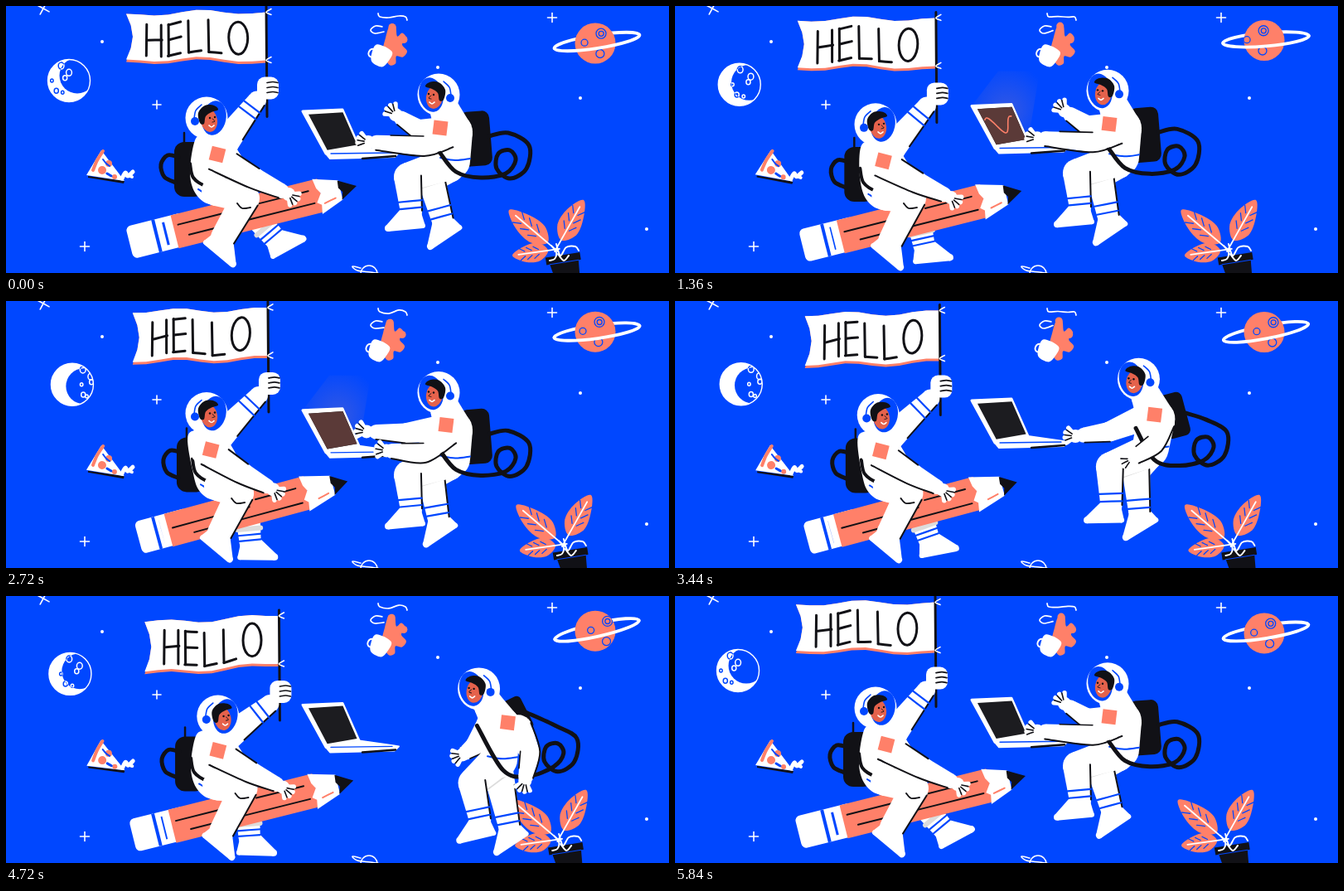
These frames come from a looping animation (800 by 322 pixels, 5920 ms). An HTML page with a canvas:

```html
<!DOCTYPE html>
<html lang="en">
<head>
<meta charset="utf-8">
<title>Hello from space</title>
<style>
html, body { margin: 0; width: 100%; height: 100%; overflow: hidden; background: #0047ff; }
canvas { display: block; width: 100vw; height: 100vh; }
</style>
</head>
<body>
<canvas id="stage" width="800" height="322" role="img" aria-label="HELLO"></canvas>
<script>
const c = document.getElementById('stage').getContext('2d');
const BLUE = '#0047ff', CORAL = '#ff8069', SKIN = '#e5624c', BLACK = '#111116', WHITE = '#fff', GREY = '#dcdcdc';
const LOOP = 5920, STEP = 80, TAU = Math.PI * 2, ORIGIN = [0, 0];

// Shared rhythms: every part moves with one or two of these.
let now, tide, drift, bob, kick, sway, lean;
function setTime(t) {
  const a = t / LOOP * TAU;
  now = t;
  tide = .5 - .5 * Math.cos(a);
  drift = Math.sin(a);
  bob = -Math.cos(2 * a);
  kick = .5 + .5 * Math.cos(3 * a);
  sway = Math.sin(3 * a);
  lean = ramp(3200, 4000) * (1 - ramp(4500, 5760));
}

const clamp = (x, a = 0, b = 1) => Math.max(a, Math.min(b, x));
const ramp = (a, b) => { const k = clamp((now - a) / (b - a)); return k * k * (3 - 2 * k); };
const lerp = (a, b, k) => a + (b - a) * k;
const add = (p, x, y) => [p[0] + x, p[1] + y];
const mix = (a, b, k) => [lerp(a[0], b[0], k), lerp(a[1], b[1], k)];
const angle = (a, b) => Math.atan2(b[1] - a[1], b[0] - a[0]);
const polar = (p, a, r) => add(p, Math.cos(a) * r, Math.sin(a) * r);
const range = (n, f) => Array.from({ length: n }, (_, i) => f(i));
const pts = (o, ...n) => range(n.length / 2, i => add(o, n[2 * i], n[2 * i + 1]));

function trace(p, closed) {
  const n = p.length, g = i => closed ? p[(i + n) % n] : p[clamp(i, 0, n - 1)];
  c.beginPath();
  c.moveTo(...p[0]);
  for (let i = 0; i < (closed ? n : n - 1); i++) {
    const a = g(i - 1), b = g(i), d = g(i + 1), e = g(i + 2);
    c.bezierCurveTo(b[0] + (d[0] - a[0]) / 6, b[1] + (d[1] - a[1]) / 6,
      d[0] - (e[0] - b[0]) / 6, d[1] - (e[1] - b[1]) / 6, d[0], d[1]);
  }
}
function fill(color) { c.fillStyle = color; c.fill(); }
function stroke(color, w) { c.strokeStyle = color; c.lineWidth = w; c.stroke(); }
function blob(p, color) { trace(p, true); fill(color); }
function line(p, color = BLACK, w = 2) { trace(p); stroke(color, w); }
function poly(p, color) {
  c.beginPath();
  p.forEach(q => c.lineTo(...q));
  c.closePath();
  fill(color);
}
function oval(p, rx, ry = rx, rot = 0) { c.beginPath(); c.ellipse(p[0], p[1], rx, ry, rot, 0, TAU); }
function disc(p, r, color) { oval(p, r); fill(color); }
function box(x, y, w, h, color, r = 0) { c.beginPath(); c.roundRect(x, y, w, h, r); fill(color); }
function local(p, rot, draw, sx = 1, sy = 1) {
  c.save();
  c.translate(...p);
  c.rotate(rot);
  c.scale(sx, sy);
  draw();
  c.restore();
}

// Body parts: each joint is a point with a radius.
const joint = (p, r) => [p[0], p[1], r];
const side = (a, b, q, s) => polar(q, angle(a, b) + Math.PI / 2, q[2] * s);
function limb(joints) {
  joints.forEach((b, i) => {
    disc(b, b[2], WHITE);
    if (!i) return;
    const a = joints[i - 1];
    poly([side(a, b, a, 1), side(a, b, b, 1), side(a, b, b, -1), side(a, b, a, -1)], WHITE);
  });
}
function edge(joints, s, color = BLACK, w = 2) {
  const last = joints.length - 1;
  line(joints.map((q, i) => side(joints[Math.max(0, i - 1)], joints[Math.min(last, i + 1)], q, s)), color, w);
}
function stripe(a, b, k, r) {
  const m = joint(mix(a, b, k), r);
  line([side(a, b, m, 1), side(a, b, m, -1)], BLUE, 2.2);
}
function boot(ankle, rot, dir) {
  local(ankle, rot, () => {
    const toe = [28, 20], heel = [-14, 17];
    limb([joint(ORIGIN, 12), joint(toe, 4), joint(heel, 3), joint(ORIGIN, 12)]);
    poly([ORIGIN, toe, heel], WHITE);
  }, dir);
}
function leg(hip, knee, ankle, rot) {
  limb([joint(hip, 20), joint(knee, 17), joint(ankle, 13)]);
  boot(ankle, rot, -1);
  edge([joint(knee, 16), joint(ankle, 13)], -1);
  stripe(knee, ankle, .7, 14);
  stripe(knee, ankle, .9, 13);
}
function hand(p, dir) {
  const finger = (d, l) => polar(p, dir + d, l);
  disc(p, 8, WHITE);
  [-.5, 0, .5, 1].forEach(d => line([p, finger(d, 13)], WHITE, 5.5));
  [-.25, .25, .75].forEach(d => line([finger(d, 5), finger(d, 13)], BLACK, 1.6));
}
function patch(p, rot) { local(p, rot, () => box(-8.5, -8.5, 17, 17, CORAL)); }
function helmet(p, dir, turn) {
  local(p, 0, () => {
    disc(ORIGIN, 25.5, WHITE);
    c.save();
    oval([9, 0], 14.5, 21, .2);
    fill(BLUE);
    c.restore();
    const f = [3 + turn, 3];
    oval(f, 10, 14, -.15);
    fill(SKIN);
    blob(pts(f, -11, 3, -13, -9, -5, -18, 6, -18, 11, -13, 3, -10, -4, -5, -6, 4), BLACK);
    disc(add(f, 1, -3), 1.2, BLACK);
    disc(add(f, 7, -4), 1.2, BLACK);
    line(pts(f, 4, -2, 7, 1, 4, 2), BLACK, 1);
    line(pts(f, 0, 6, 3, 8, 6, 6), WHITE, 1.6);
    disc([-14, 4], 5, BLUE);
    line(pts(ORIGIN, -15, 1, -13, -9, -6, -16), BLUE, 1.6);
  }, dir);
}

// Scenery
function sky() {
  box(0, 0, 800, 322, BLUE);
  const cross = (p, r, rot) => local(p, rot, () => {
    line([[-r, 0], [r, 0]], WHITE, 1.6);
    line([[0, -r], [0, r]], WHITE, 1.6);
  });
  cross([182, 119], 5, 0);
  cross([95, 290], 5.5, 0);
  cross([659, 14], 5.5, 0);
  cross([45, 3], 8, .5);
  [[116, 43], [521, 74], [693, 111], [773, 269]].forEach(p => disc(p, 2, WHITE));
  oval([438, 323], 10);
  stroke(WHITE, 1.5);
  line([[428, 316], [418, 314], [424, 319], [440, 321], [453, 323]], WHITE, 1.5);
}
function streak(start, a, b, alpha) {
  const k = (now - start) / 320;
  if (k <= 0 || k >= 1) return;
  c.globalAlpha = alpha;
  line([mix(a, b, clamp(2 * k - 1)), mix(a, b, clamp(2 * k))], WHITE, 1.5);
  c.globalAlpha = 1;
}

function moon() {
  const m = mix([76, 90], [80, 101], tide), cut = add(m, ...mix([10, -6], [14, 2], tide));
  const craters = range(6, i => {
    const y = 18 * Math.sin(i * 2.4), lon = -1 + i * .2 + 1.5 * tide;
    return [m[0] + Math.sqrt(600 - y * y) * Math.sin(lon), m[1] + y, 2 + i % 3];
  });
  const rings = color => craters.forEach(k => { oval(k, k[2] * .85, k[2]); stroke(color, 1.5); });
  c.save();
  oval(m, 25.5);
  fill(WHITE);
  c.clip();
  rings(BLUE);
  oval(cut, 21.5);
  fill(BLUE);
  c.clip();
  rings(WHITE);
  c.restore();
  oval(m, 25.5);
  stroke(WHITE, 1.4);
}

function pizza() {
  local([119, 194], .03 * drift, () => {
    poly(pts(ORIGIN, -20, 11, 24, 17, 23, 20, -20, 13), BLACK);
    poly(pts(ORIGIN, -4, -20, -22, 10, 24, 17), WHITE);
    line(pts(ORIGIN, -2, -19, -9, -8, -14, 4), CORAL, 4);
    disc([-3, 4], 5, CORAL);
    disc([5, -4], 4, CORAL);
    disc([12, 12], 3, CORAL);
    line(pts(ORIGIN, 3, 8, 8, 11), BLUE, 3);
    line(pts(ORIGIN, -2, -9, 2, -4, 6, -1), BLUE, 2);
    line(pts(ORIGIN, 21, 14, 25, 7, 28, 11, 34, 6), WHITE, 5);
    line(pts(ORIGIN, 25, 9, 33, 12), WHITE, 4);
  });
}

function coffee() {
  const p = [452 - 3 * tide, 60.5], flow = 1.5 * sway;
  blob(pts(p, 3, -6, 6, -22, 11, -37, 18, -37, 20, -24, 26, -28, 31, -22, 26, -14, 32, -6, 27, 1, 19, 0, 18, 9, 10, 10), CORAL);
  disc(add(p, 14, -35 + flow), 4.5, CORAL);
  disc(add(p, 28 + flow, -20), 4.5, CORAL);
  local(p, .45, () => {
    blob(pts(ORIGIN, -10, -11, 10, -11, 11, 2, 7, 11, -6, 11, -11, 2), WHITE);
    oval([-11, 1], 4, 5);
    stroke(WHITE, 2);
  });
  line(pts([449, 9], 0, 0, 2, 4, 13, 5 + flow, 25, 3 - flow, 33, 4, 35, 8), WHITE, 1.7);
  line(pts([454, 25], 0, 0, -8, -1, -14, 4, -9, 8, 2, 6 + flow), WHITE, 1.7);
}

function saturn() {
  const p = [711, 45 - 8 * tide], ring = add(p, 2, -2 + 2 * tide);
  const half = a => {
    c.beginPath();
    c.ellipse(...ring, 52, 8, -.155 + .07 * drift, a, a + Math.PI);
    stroke(WHITE, 3.8);
  };
  half(Math.PI);
  disc(p, 24.5, CORAL);
  c.save();
  oval(p, 24.5);
  c.clip();
  range(4, i => {
    oval(add(p, 13 * Math.cos(i * 2.1 - 1) - 8 * drift, 14 * Math.sin(i * 2.1 - 1)), 6 - i);
    stroke(BLUE, 1.3);
  });
  c.restore();
  half(0);
}

function leaf(base, tip, w) {
  const len = Math.hypot(tip[0] - base[0], tip[1] - base[1]);
  local(base, angle(base, tip), () => {
    blob(pts(ORIGIN, len * .12, 0, len * .35, -w, len * .7, -w * .9, len, 0, len * .7, w * .8, len * .35, w), CORAL);
    line([[-8, 0], [len * .85, 0]], WHITE, 1.8);
    for (const k of [.35, .52, .69]) for (const s of [-1, 1]) {
      line([[len * k, s * 3], [len * (k + .12), s * w * .65]], BLUE, 1.3);
    }
  });
}
function plant() {
  local([670 + 9 * tide, 305], 0, () => {
    leaf([-10, -14], [-63, -59], 13);
    leaf([-4, -16], [27, -71], 13);
    leaf([-10, -11], [-59, -4], 11);
    local([4, 4], -.16, () => {
      poly(pts(ORIGIN, -22, -9, 20, -9, 20, 0, 17, 0, 15, 26, -13, 26, -18, 0, -22, 0), BLACK);
      line(pts(ORIGIN, -18, 0, 17, 0), BLUE, 1);
    });
    line(pts(ORIGIN, -12, -16, -6, -8, -8, 0, -14, 2), WHITE, 2);
    line(pts(ORIGIN, -6, -18, -1, -4, 6, -14, 17, -15, 21, -10), WHITE, 2);
    line(pts(ORIGIN, -4, -6, 3, 2, 9, -4), WHITE, 2);
  });
}

// Flag, hung from the raised fist
function flag(fist) {
  const phase = now / LOOP * TAU * 8, flutter = -Math.cos(phase);
  const tr = add(fist, -2, -91), br = add(tr, 0, 58);
  const tl = add(tr, -165 + 4 * flutter, 5 + 3 * flutter), bl = add(br, -165 + 4 * flutter, 5 + 6 * flutter);
  const at = (u, v) => add(mix(mix(tl, tr, u), mix(bl, br, u), v),
    8 * (1 - u) ** 4 * Math.sin(Math.PI * v), 4 * Math.sin(TAU * 1.4 * u - phase) * Math.sin(Math.PI * u));
  const hem = dy => range(11, i => add(at(1 - i / 10, 1), 0, dy));
  const cloth = dy => [...range(11, i => at(i / 10, 0)), ...hem(dy), ...range(3, i => at(0, .75 - i / 4))];
  poly(cloth(3), CORAL);
  poly(cloth(0), WHITE);
  line([add(fist, -2, -98), add(fist, -1, 35)], BLACK, 3);
  for (const q of [tr, br]) line(pts(q, 6, -4, 0, 0, 6, 3), WHITE, 1.6);

  const write = (...uv) => line(pts(ORIGIN, ...uv).map(q => at(...q)), BLACK, 3);
  const stem = u => write(u, .21, u + .005, .89);
  const bar = (u, v, w = .09) => write(u, v, u + w, v - .02);
  stem(.13);
  stem(.24);
  bar(.13, .55, .11);
  stem(.295);
  [.22, .54, .89].forEach(v => bar(.295, v));
  for (const u of [.44, .585]) {
    stem(u);
    bar(u + .005, .89);
  }
  trace(range(12, i => at(...add([.8, .51], .068 * Math.cos(i / 12 * TAU), .34 * Math.sin(i / 12 * TAU)))), true);
  stroke(BLACK, 3);
}

function pencil() {
  const end = [149 + 11 * tide, 287.5 + 2 * bob], tip = [423 - 11 * tide, 220 + 3 * bob];
  const roll = 6 * tide, body = 56 - 16 * tide, wood = 232 - 10 * tide;
  local(end, angle(end, tip), () => {
    box(0, -20, 70, 40, WHITE, 6);
    box(body * .57, -20, 4, 40, BLUE);
    box(body * .78, -14, 3 * (1 - tide), 28, BLUE);
    box(body, -20, wood + 6 - body, 41, CORAL);
    poly(pts([wood, 0], 0, -21, 262 - wood, -12, 262 - wood, 12, 2, 23, 4, 12, -1, 8, 6, -2, 2, -9), WHITE);
    poly(pts(ORIGIN, 261, -12, 282, 0, 261, 12, 264, 3, 260, -3), BLACK);
    line(pts(ORIGIN, body + 6, -7 + roll, 150, -7 + roll));
    line(pts(ORIGIN, 72, 8 + roll / 2, wood - 4, 8 + roll / 2));
    line(pts(ORIGIN, 160, -8, wood - 8, -8));
    line(pts(ORIGIN, 240, 11, 254, 8), CORAL, 2);
  }, Math.hypot(tip[0] - end[0], tip[1] - end[1]) / 282);
}

function rider() {
  const chest = [255 - 8 * tide + 4 * lean, 183 + 4 * bob], pack = [219 + 3 * tide, 200 + 3 * bob];
  const head = [242 + 15 * lean, 139 + 4 * bob + 3 * lean], fist = [316 + 2 * tide + 16 * lean, 102 + 3.5 * bob + 11 * lean];
  const palm = [341 - 19 * tide, 229 + 2 * bob], hip = add(pack, 35, 26);
  const knee = [289 - 7 * tide, 232], foot = [262 - 4 * tide, 281 + 2 * bob];

  const thigh = [290, 240], ankle = mix([290, 293], [324, 280], kick);
  limb([joint(thigh, 16), joint(ankle, 13)]);
  boot(ankle, -.6 * kick, 1);
  const shade = joint(mix(thigh, ankle, .68), 14);
  line([side(thigh, ankle, shade, 1), side(thigh, ankle, shade, -1)], GREY, 6);
  stripe(thigh, ankle, .82, 14);
  stripe(thigh, ankle, .95, 13);

  line(pts(pack, -4, -44, -4, -28), BLACK, 2.5);
  box(pack[0] - 16, pack[1] - 33, 36, 66, BLACK, 12);
  line(pts(pack, -11, -15, -24, -17, -32, -6, -28, 9, -14, 16), BLACK, 5);
  pencil();

  blob([...pts(chest, -28, -14, -18, -24, 8, -24, 24, -6, 38, 24), ...pts(hip, 30, 14, -5, 17, -24, 5, -32, -20)], WHITE);
  line(pts(hip, -22, -2, -6, 6, 16, 4), BLUE, 2);
  line(pts(pack, 3, -7, 7, 10, 22, 20, 38, 18, 50, 9), BLACK, 4);
  limb([joint(hip, 18), joint(knee, 17), joint(foot, 15)]);
  boot(foot, .6, 1);
  edge([joint(knee, 17), joint(foot, 15)], -1);
  line(pts(knee, -10, 6, -4, 12, 6, 11), BLACK, 1.8);

  flag(fist);
  const shoulder = add(chest, 9, -14), wrist = add(fist, -13, 15);
  limb([joint(shoulder, 17), joint(wrist, 11)]);
  edge([joint(mix(shoulder, wrist, .25), 15), joint(wrist, 11)], 1);
  stripe(shoulder, wrist, .7, 12.5);
  stripe(shoulder, wrist, .84, 12);
  box(fist[0] - 13, fist[1] - 13, 26, 27, WHITE, 9);
  for (const y of [-6, 0, 6]) line(pts(fist, -1, y, 6, y - 1, 12, y), BLACK, 1.7);

  helmet(head, 1, 3 * lean);

  const root = add(chest, -7, 0), elbow = add(mix(root, palm, .55), 0, 2);
  const arm = [joint(root, 18), joint(elbow, 13), joint(mix(elbow, palm, .8), 9)];
  limb(arm);
  edge([joint(mix(root, elbow, .1), 17), ...arm.slice(1)], 1);
  edge([joint(mix(root, elbow, .45), 15.5), joint(elbow, 13)], -1);
  hand(palm, .45);
  patch(chest, .25);
}

function laptop() {
  const tl = [358, 127], tr = [406, 125], br = [426, 170], bl = [386, 178], tip = [474, 177];
  const at = (u, v) => mix(mix(tl, tr, u), mix(bl, br, u), v);
  const glow = ramp(320, 720) * (1 - ramp(2720, 3200)), wave = ramp(400, 640) * (1 - ramp(2320, 2640));
  local([0, 7 * sway], 0, () => {
    const g = c.createRadialGradient(400, 135, 5, 400, 125, 50);
    g.addColorStop(0, `rgba(120,110,190,${.4 * glow})`);
    g.addColorStop(1, 'rgba(120,110,190,0)');
    poly([tl, [390, 85], [440, 85], br], g);
    poly([bl, br, add(tip, -6, -1), tip, add(tip, -5, 5), add(bl, 5, 6)], WHITE);
    stroke(WHITE, 2);
    poly([tl, tr, br, bl], WHITE);
    stroke(WHITE, 3);
    const glass = [at(.1, .08), at(.98, .07), at(.97, .94), at(.09, .93)];
    poly(glass, '#1c1c20');
    c.globalAlpha = glow;
    poly(glass, '#5b3a38');
    c.globalAlpha = wave;
    line(range(13, i => at(.14 + i * .06, .5 + .2 * Math.sin(i * .6 - now / 160))), CORAL, 1.6);
    c.globalAlpha = 1;
    line([add(bl, 6, 0), add(tip, -8, 0)], BLUE, 1.3);
    line([add(tip, -44, 7), add(tip, -4, 4)], BLACK, 2.5);
  });
}

// Floating coder: four poses, blended one after another.
const sit = {
  head: [522, 107], chest: [540, 152], hip: [538, 187], patch: [524, 147],
  pack: [567, 160], packFit: [1, -.08], loop: [613, 182], strap: [523, 176],
  kneeA: [485, 206], ankleA: [489, 248], kneeB: [513, 208], ankleB: [525, 259], feet: [0, -.5],
  shoulder: [532, 155], elbow: [503, 169], hand: [437, 164], farElbow: [498, 149], farHand: [470, 131]
};
const typing = { ...sit, patch: [531, 146], elbow: [503, 180], hand: [459, 177], farElbow: [482, 156], farHand: [435, 154] };
const stand = {
  head: [599, 91], chest: [623, 142], hip: [611, 180], patch: [629, 138],
  pack: [640, 125], packFit: [.62, -.45], loop: [685, 172], strap: [591, 140],
  kneeA: [567, 203], ankleA: [566, 255], kneeB: [602, 210], ankleB: [600, 261], feet: [.15, -.4],
  shoulder: [643, 147], elbow: [656, 177], hand: [648, 215], farElbow: [567, 170], farHand: [534, 183]
};
const turned = {
  head: [535, 131], chest: [566, 168], hip: [575, 212], patch: [576, 164],
  pack: [590, 160], packFit: [.72, -.5], loop: [653, 196], strap: [540, 170],
  kneeA: [557, 246], ankleA: [580, 284], kneeB: [593, 250], ankleB: [624, 293], feet: [-.5, -.6],
  shoulder: [587, 170], elbow: [603, 198], hand: [599, 226], farElbow: [566, 186], farHand: [572, 195]
};
const cues = [[typing, 2160, 2640], [stand, 2900, 4000], [turned, 4350, 5150], [sit, 5250, 5760]];
function coder() {
  const p = {};
  for (const key in sit) p[key] = cues.reduce((v, [pose, a, b]) => mix(v, pose[key], ramp(a, b)), sit[key]);
  const [size, tilt] = p.packFit, { chest, hip, elbow } = p;
  local([0, 5 * sway], 0, () => {
    local(p.pack, tilt, () => box(-18, -33, 36, 66, BLACK, 9), size, size);

    const farArm = [joint(add(chest, -14, -2), 16), joint(p.farElbow, 12), joint(mix(p.farElbow, p.farHand, .75), 9)];
    limb(farArm);
    edge(farArm.slice(1), -1, BLACK, 1.8);
    hand(p.farHand, angle(p.farElbow, p.farHand));

    leg(add(hip, -4, 6), p.kneeB, add(p.ankleB, 6 * kick - 4, 0), p.feet[1]);
    edge([joint(hip, 20), joint(p.kneeA, 17)], -1, GREY, 3);
    leg(add(hip, -6, 4), p.kneeA, p.ankleA, p.feet[0]);
    limb([joint(mix(chest, p.head, .6), 18), joint(chest, 23), joint(hip, 22)]);
    line(pts(hip, -14, -4, 4, -1, 22, -3), BLUE, 2);
    line([...pts(p.pack, 16 * size, -3), ...pts(p.loop, -7, -29, 18, -14, 15, 14, -5, 26, -21, 14, -19, -4, -5, -8, 2, 4, -10, 20),
      ...pts(hip, 35, 20, 5, 13), p.strap], BLACK, 5);

    helmet(p.head, -1, 2);

    const arm = [joint(p.shoulder, 17), joint(elbow, 12), joint(mix(elbow, p.hand, .85), 9)];
    limb(arm);
    edge(arm, -1);
    edge([joint(elbow, 12), joint(mix(elbow, p.hand, .6), 10)], 1, BLACK, 1.6);
    hand(p.hand, angle(elbow, p.hand) - .15);
    patch(p.patch, .12);
  });
}

function frame() {
  setTime(Math.floor(performance.now() % LOOP / STEP) * STEP);
  c.lineCap = c.lineJoin = 'round';
  sky();
  streak(640, [525, 296], [590, 252], 1);
  streak(640, [738, 186], [754, 175], .5);
  streak(4000, [150, 177], [181, 153], 1);
  moon();
  pizza();
  coffee();
  saturn();
  plant();
  rider();
  laptop();
  coder();
  requestAnimationFrame(frame);
}
frame();
</script>
</body>
</html>
```
